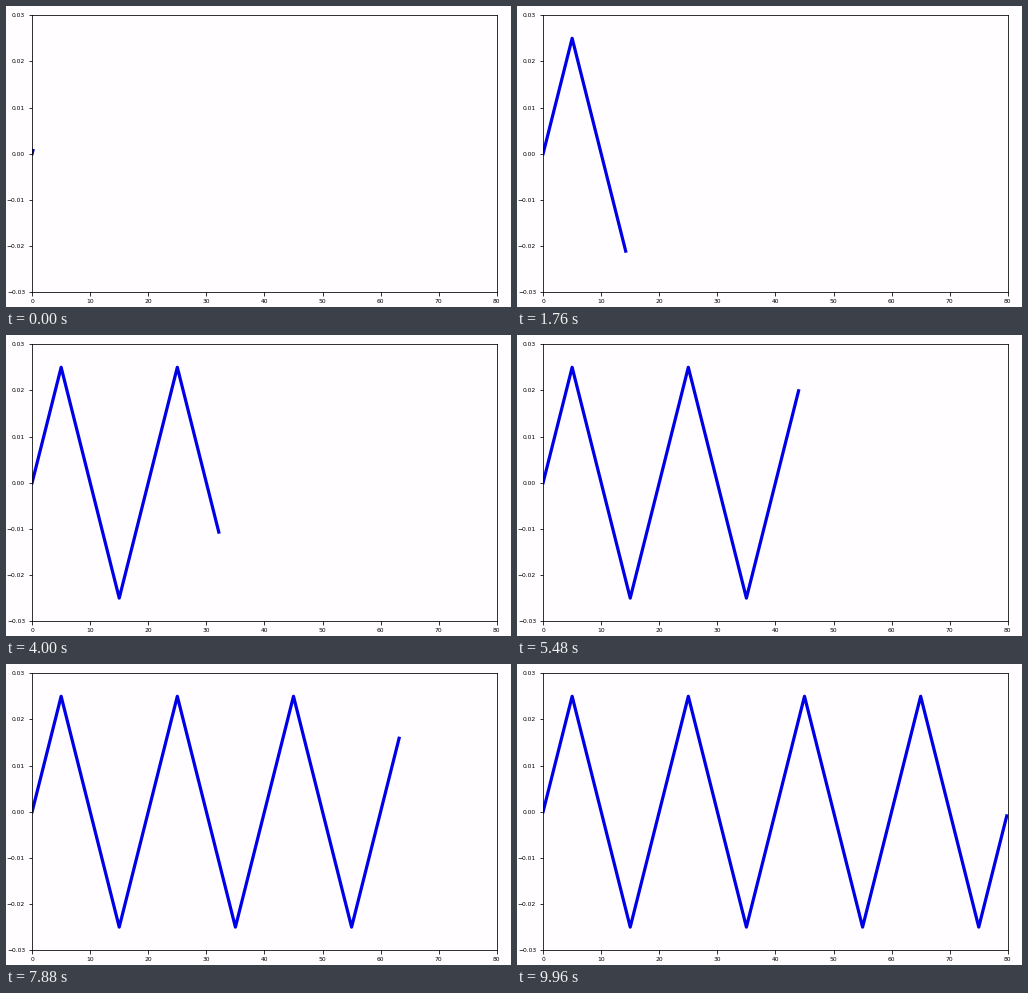
Animation, 505 px wide and 301 px high, one loop 10 s. Source, as a matplotlib script:

```python
import numpy as np
import matplotlib.pyplot as plt
from matplotlib.animation import FuncAnimation

W, H, DPI = 505, 301, 72
FRAMES, INTERVAL = 250, 40
X_MAX, PERIOD, PEAK = 80, 20, 0.025
STEP = X_MAX / FRAMES
LEAD = 0.14  # length already drawn at the start
BACKGROUND = "#fffdff"

plt.rcParams["font.family"] = "DejaVu Sans"


def triangle(x):
    return PEAK * 2 / np.pi * np.arcsin(np.sin(2 * np.pi * x / PERIOD))


# Axes edges in pixels, measured from the top left
LEFT, RIGHT, TOP, BOTTOM = 26.1, 490.8, 9.2, 286.2

fig = plt.figure(figsize=(W / DPI, H / DPI), dpi=DPI, facecolor=BACKGROUND)
ax = fig.add_axes([LEFT / W, 1 - BOTTOM / H,
                   (RIGHT - LEFT) / W, (BOTTOM - TOP) / H],
                  facecolor=BACKGROUND)
ax.set_xlim(0, X_MAX)
ax.set_ylim(-0.03, 0.03)
ax.set_xticks(np.arange(0, 81, 10))
ax.set_yticks(np.linspace(-0.03, 0.03, 7))
ax.yaxis.set_major_formatter("{x:.2f}")
ax.tick_params(labelsize=6)

line, = ax.plot([], [], color="#0000e6", linewidth=3.2)


def update(frame):
    end = frame * STEP + LEAD
    corners = np.arange(PERIOD / 4, end, PERIOD / 2)
    x = np.concatenate(([0], corners, [end]))
    line.set_data(x, triangle(x))
    return line,


anim = FuncAnimation(fig, update, frames=FRAMES, interval=INTERVAL,
                     repeat=True, repeat_delay=0, blit=False)
plt.show()
```
